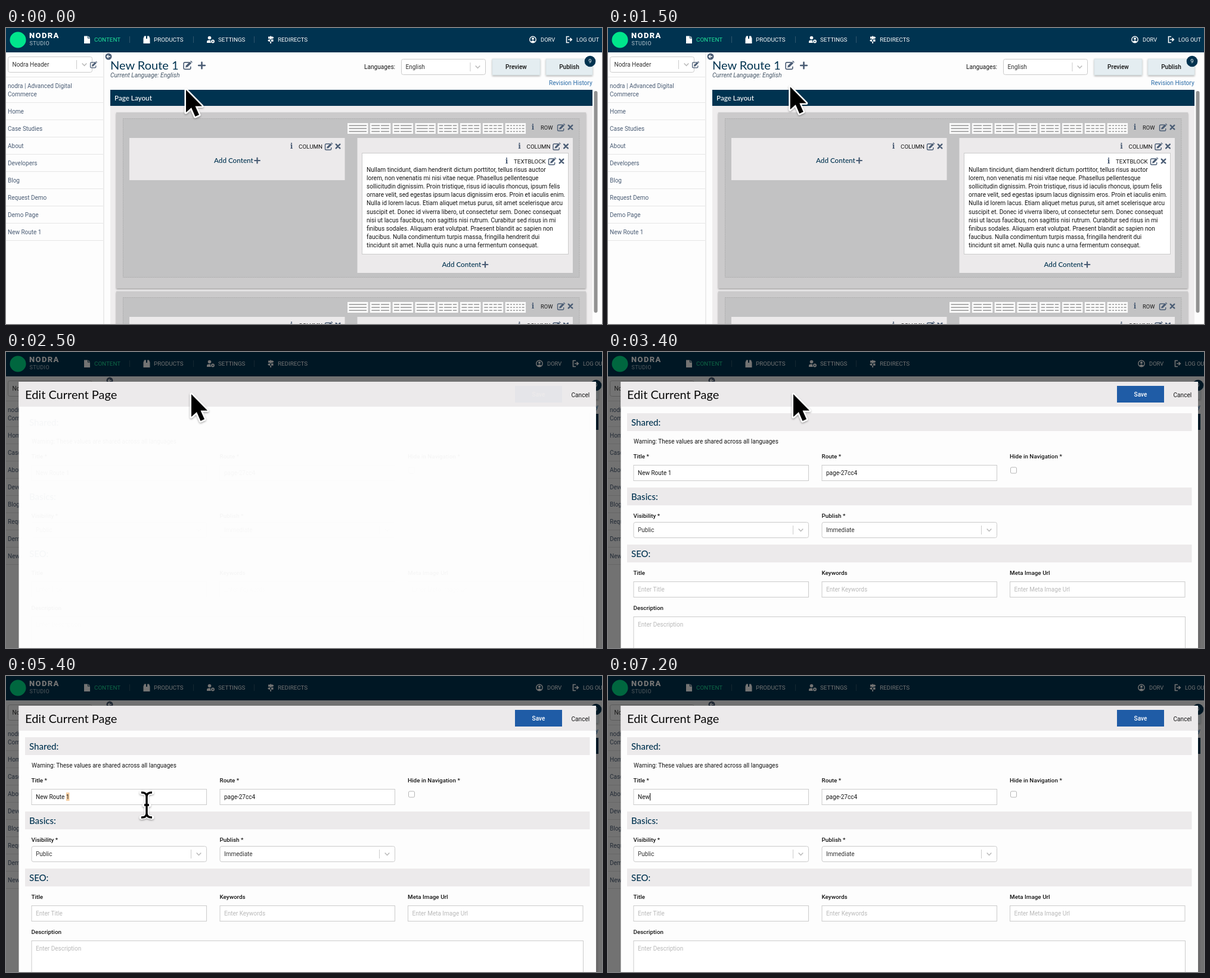
Animation, 1000 px wide and 498 px high, one loop 7300 ms. Source, as an HTML page:

```html
<!DOCTYPE html>
<html lang="en">
<head>
<meta charset="utf-8">
<title>Page editor</title>
<style>
  html, body { margin: 0; width: 100%; height: 100%; overflow: hidden; background: #fdfdfd; }
  svg { display: block; width: 100%; height: 100%; }
  text { font: 10px Roboto, sans-serif; white-space: pre; }
  .caps { font-size: 9.8px; }
  .small { font-size: 9.4px; }
  .body { font-size: 10.15px; }
  .label { font-weight: 500; font-size: 9.9px; }
  .button { font-weight: 500; font-size: 10.1px; }
  .italic { font-style: italic; font-size: 10.3px; }
  .head { font: 20px Lato, sans-serif; }
  .section { font: 500 15px Lato, sans-serif; }
  .bar { font: 500 11.7px Lato, sans-serif; }
  .info { font: bold 12px "DejaVu Serif", serif; }
  .brand { font-weight: 900; font-size: 13px; letter-spacing: 1.4px; }
  .sub { font-size: 9px; letter-spacing: .4px; }
</style>
</head>
<body>
<svg viewBox="0 0 1000 498" preserveAspectRatio="none">
  <defs>
    <filter id="shadow" x="-20%" y="-20%" width="140%" height="150%">
      <feDropShadow dx="0" dy="1.5" stdDeviation="1.5" flood-opacity=".35"/>
    </filter>
    <g id="edit" fill="none" stroke="#4b5d75">
      <path d="M2 -4.5H-4Q-6 -4.5 -6 -2.5V4Q-6 5.5 -4 5.5H2.5Q4.2 5.5 4.2 4V1.5" stroke-width="1.4"/>
      <path d="M-2 1.8L4.2 -4.4" stroke-width="3.2"/>
      <path d="M-3.6 3.2L-2.6 .6L-1 2.2Z" fill="#4b5d75" stroke="none"/>
      <path d="M4.8 -5L5.7 -5.9" stroke-width="3.2"/>
    </g>
    <path id="cross" d="M-3.3 -3.3L3.3 3.3M3.3 -3.3L-3.3 3.3" stroke="#4b5d75" stroke-width="2.4" stroke-linecap="round"/>
    <path id="plus" d="M-4.4 0H4.4M0 -4.4V4.4" stroke="#4b5d75" stroke-width="2.2" stroke-linecap="round"/>
    <path id="chevron" d="M-3.8 -2L0 2L3.8 -2" fill="none" stroke="#b8b8b8" stroke-width="1.5"/>
  </defs>
  <g id="page"></g>
  <g id="modal"></g>
  <g id="pointer"></g>
</svg>
<script>
const NAVY = '#003350', SLATE = '#4b5d75', PALE = '#eceaeb', INK = '#151515', LINE = '#cbcbcb';
const find = id => document.getElementById(id);

// Markup helpers; text is placed by the middle of its line.
const text = (x, y, str, cls = '', fill = INK, more = '') =>
  `<text x="${x}" y="${y + 3.5}" class="${cls}" fill="${fill}" ${more}>${str}</text>`;
const centered = (x, y, str, cls, fill) => text(x, y, str, cls, fill, 'text-anchor="middle"');
const rect = (x, y, w, h, fill, more = '') =>
  `<rect x="${x}" y="${y}" width="${w}" height="${h}" fill="${fill}" ${more}/>`;
const path = (d, fill, more = '') => `<path d="${d}" fill="${fill}" ${more}/>`;
const icon = (id, x, y, scale = 1) =>
  `<use href="#${id}" transform="translate(${x} ${y}) scale(${scale})"/>`;
const outlined = (x, y, w, h, radius = 0) =>
  rect(x + .5, y + .5, w - 1, h - 1, '#fff', `stroke="${LINE}" rx="${radius}"`);
const select = (x, y, w, value, gap) =>
  outlined(x, y, w, 27, 3) + text(x + 7.5, y + 13, value, '', '#333') +
  rect(x + w - gap, y + 6, 1, 15, LINE) + icon('chevron', x + w - 13.5, y + 13.5);

function header() {
  const separators = [207, 314, 416].map(x => rect(x, 14, 1, 11, '#2f566d')).join('');
  return rect(0, 0, 1000, 41, NAVY) +
    '<circle cx="20" cy="20" r="13.5" fill="#00e58c"/>' +
    text(39, 13.5, 'NODRA', 'brand', '#fff') + text(39.5, 25.5, 'STUDIO', 'sub', '#b9c8d1') +
    separators +
    path('M131 13.5H137V17.5H141V26H131Z M138 13.5L141 16.5H138Z', '#fff') +
    text(148, 19.5, 'CONTENT', 'caps', '#1fe39a') +
    path('M232 13.5H235V18H237V13.5H240L241.5 17.5V26H230.5V17.5Z', '#fff') +
    text(248, 19.5, 'PRODUCTS', 'caps', '#fff') +
    '<circle cx="341.5" cy="16.5" r="2.8" fill="#fff"/><circle cx="347" cy="22.5" r="2" fill="none" stroke="#fff" stroke-width="1.8"/>' +
    path('M337 25V23Q337 20.5 340 20.5H343Q343 24 344 25Z', '#fff') +
    text(356, 19.5, 'SETTINGS', 'caps', '#fff') +
    path('M440 14.5H447.5L449.5 16.3L447.5 18H440Z M448.5 19.3H441L439 21L441 22.8H448.5Z M443.3 13.5H445V26H443.3Z', '#fff') +
    text(456, 19.5, 'REDIRECTS', 'caps', '#fff') +
    '<g id="account">' +
    '<circle cx="884" cy="19.5" r="5.2" fill="none" stroke="#fff" stroke-width="1.4"/><circle cx="884" cy="18" r="2" fill="#fff"/>' +
    path('M880.5 23Q884 19 887.5 23Q884 26 880.5 23Z', '#fff') +
    text(897, 19.5, 'DORV', 'small', '#fff') +
    path('M945 14.5H940.5V24.5H945M943 19.5H949M946.5 16.8L949.3 19.5L946.5 22.2', 'none', 'stroke="#fff" stroke-width="1.6"') +
    text(957, 19.5, 'LOG OUT', 'small', '#fff') + '</g>';
}

function sidebar() {
  const links = ['Home', 'Case Studies', 'About', 'Developers', 'Blog', 'Request Demo', 'Demo Page', 'New Route 1'];
  return select(3, 48, 142, 'Nodra Header', 27) + icon('edit', 147, 62, .9) +
    rect(0, 82, 163, 1, '#e6e6e6') +
    text(3, 97, 'nodra | Advanced Digital', '', SLATE) + text(3, 111, 'Commerce', '', SLATE) +
    rect(0, 125, 163, 1, '#e6e6e6') +
    links.map((label, i) => text(3, 140 + 29 * i, label, '', SLATE) +
      rect(0, 154 + 29 * i, 163, 1, '#e6e6e6')).join('');
}

const tools = (right, y, label, cls, labelX, infoX) =>
  centered(infoX, y + .5, 'i', 'info', SLATE) + text(labelX, y, label, cls) +
  icon('edit', right - 15.5, y + .5) + icon('cross', right, y);

// Small pictures of the row layouts; each list holds the column breaks.
const layouts = [[], [1/2], [1/3], [2/3], [1/4, 3/4], [1/3, 2/3], [1/4, 1/2, 3/4], [1/6, 1/3, 1/2, 2/3, 5/6]];
const layoutIcon = (breaks, x, y) => rect(x, y, 34.5, 18, '#fafafa') +
  [4, 9, 14].map(dy => rect(x + 2.5, y + dy - .6, 29.5, 1.4, '#8d8d8d')).join('') +
  breaks.map(b => rect(x + 16.3 + (b - .5) * 29.5, y + 1, 2, 16, '#fafafa')).join('');

const addContent = (x, y) => text(x, y + .6, 'Add Content', 'bar', NAVY) + icon('plus', x + 72.5, y);

function row(y) {
  const column = (x, h) => rect(x, y + 43, 361.5, h, PALE) +
    tools(x + 350, y + 57, 'COLUMN', 'caps', x + 284, x + 272);
  return rect(185, y, 788, 296, '#cbcacb', 'filter="url(#shadow)"') +
    rect(196.5, y + 10.5, 765.5, 267, '#c2c2c3', 'stroke="#adadad" stroke-dasharray="2 1"') +
    layouts.map((breaks, i) => layoutIcon(breaks, 573 + 37.8 * i, y + 18)).join('') +
    tools(947, y + 25, 'ROW', 'small', 897, 884) +
    column(207, 71) + column(589.5, 227);
}

function content() {
  const lorem = [
    'Nullam tincidunt, diam hendrerit dictum porttitor, tellus risus auctor',
    'lorem, non venenatis mi nisi vitae neque. Phasellus pellentesque',
    'sollicitudin dignissim. Proin tristique, risus id iaculis rhoncus, ipsum felis',
    'ornare velit, sed egestas ipsum lacus dignissim eros. Proin et iaculis enim.',
    'Nulla id lorem lacus. Etiam aliquet metus purus, sit amet scelerisque arcu',
    'suscipit et. Donec id viverra libero, ut consectetur sem. Donec consequat',
    'nisi ut lacus faucibus, non sagittis nisi rutrum. Curabitur sed risus in mi',
    'finibus sodales. Aliquam erat volutpat. Praesent blandit ac sapien non',
    'faucibus. Nulla condimentum turpis massa, fringilla hendrerit dui',
    'tincidunt sit amet. Nulla quis nunc a urna fermentum consequat.'];
  const button = (x, w, label) =>
    rect(x, 52, w, 27, '#e4edf1', 'filter="url(#shadow)" stroke="#cdd9de" stroke-width=".6"') +
    centered(x + w / 2, 65, label, 'button', INK);
  return rect(163.5, 41, 1, 457, '#dcdcdc') +
    text(175, 66.5, 'New Route 1', 'head', NAVY) +
    icon('edit', 305, 63, 1.15) + icon('plus', 328.5, 63, 1.2) +
    text(175, 79.5, 'Current Language: English', 'italic', '#445566') +
    text(601, 65, 'Languages:', 'body') + select(663, 52, 142, 'English', 26.5) +
    button(816, 80, 'Preview') + button(906, 78, 'Publish') +
    `<circle cx="980" cy="56" r="9.3" fill="${NAVY}"/>` + centered(980, 55.5, '9', 'small', '#fff') +
    text(911, 92.5, 'Revision History', 'body', '#2a6ca8') +
    rect(175, 104, 809, 394, '#efedee') + rect(175, 104, 809, 27, NAVY) +
    text(182, 118.5, 'Page Layout', 'bar', '#fff') +
    row(142) + row(443) +
    addContent(349, 223) + addContent(731.5, 398) +
    outlined(597, 210, 347, 171) + tools(932, 224, 'TEXTBLOCK', 'caps', 852, 840) +
    lorem.map((line, i) => text(605, 238.3 + 14.17 * i, line, 'body')).join('') +
    rect(986.5, 106, 6, 373, '#929292', 'rx="3" id="scrollbar"');
}

find('page').innerHTML = rect(0, 0, 1000, 498, '#fdfdfd') + sidebar() +
  `<g id="content">${content()}</g>` + header() +
  `<g id="collapse"><circle cx="172" cy="48" r="5.5" fill="${SLATE}"/>` +
  path('M175 48H169.5M171.8 45.5L169.3 48L171.8 50.5', 'none', 'stroke="#fff" stroke-width="1.3"') + '</g>';

const section = (y, label) => rect(32, y, 947.5, 30, PALE) + text(39, y + 17.3, label, 'section', NAVY);
const field = (x, y, label, value, fill) =>
  text(x, y - 15, label, 'label') + outlined(x, y, 294.5, 27) + text(x + 7.5, y + 13, value, '', fill);
const picker = (x, label, value) => text(x, 275, label, 'label') + select(x, 286, 294.5, value, 27);

find('modal').innerHTML = rect(0, 0, 1000, 498, 'rgba(0,0,0,.55)') +
  rect(21.5, 50, 968.5, 448, '#fdfdfd') + rect(21.5, 50, 968.5, 42, PALE) +
  text(32, 75.3, 'Edit Current Page', 'head', '#080808') + text(948.5, 72, 'Cancel', 'body') +
  '<g id="form">' +
  rect(854, 57, 79, 28, '#1f5ca6') + centered(893.5, 71, 'Save', 'button', '#fff') +
  section(103, 'Shared:') + section(228, 'Basics:') + section(324, 'SEO:') +
  text(43, 150.5, 'Warning: These values are shared across all languages') +
  field(42.5, 190, 'Title *', '') + field(358.5, 190, 'Route *', 'page-27cc4') +
  rect(0, 196, 0, 14, '#f6cfa4', 'id="selection"') +
  text(50, 203, 'New Route 1', '', INK, 'id="title"') +
  rect(0, 197, 1, 12.5, '#000', 'id="caret"') +
  text(674, 175, 'Hide in Navigation *', 'label') +
  rect(675.5, 194, 10, 10, '#fff', 'rx="2" stroke="#b5b5b5"') +
  picker(42.5, 'Visibility *', 'Public') + picker(358.5, 'Publish *', 'Immediate') +
  field(42.5, 386, 'Title', 'Enter Title', '#b9b9b9') +
  field(358.5, 386, 'Keywords', 'Enter Keywords', '#b9b9b9') +
  field(674, 386, 'Meta Image Url', 'Enter Meta Image Url', '#b9b9b9') +
  text(42.5, 430.5, 'Description', 'label') + outlined(42.5, 445, 926.5, 70) +
  text(50, 458, 'Enter Description', '', '#b9b9b9') + '</g>';

const beam = 'M-9 -21Q0 -21 0 -14Q0 -21 9 -21M0 -14V14M-9 21Q0 21 0 14Q0 21 9 21M-4 0H4';
find('pointer').innerHTML = '<g filter="url(#shadow)">' +
  path('M0 0V38L9 30L15.5 45L22 42L15.5 27.5H27Z', '#000', 'id="arrow" stroke="#fff" stroke-width="5" paint-order="stroke" stroke-linejoin="round"') +
  '<g id="beam">' + path(beam, 'none', 'stroke="#fff" stroke-width="6.5" stroke-linecap="round"') +
  path(beam, 'none', 'stroke="#000" stroke-width="3.4"') + '</g></g>';

const LOOP = 7300, OPEN = 2500, CLICK = 4900, SELECT = 5400, TYPE = 6700;
const OLD_TITLE = 'New Route 1', NEW_TITLE = 'New';
const stops = [[0, 302, 104], [900, 305, 103], [1300, 305, 103], [2200, 311, 71], [3700, 311, 71], [4700, 236, 217]];

function pointerAt(t) {
  const next = stops.findIndex(stop => stop[0] > t);
  if (next < 0) return stops.at(-1).slice(1);
  const [t0, x0, y0] = stops[next - 1], [t1, x1, y1] = stops[next];
  const p = (t - t0) / (t1 - t0), ease = p * p * (3 - 2 * p);
  return [x0 + (x1 - x0) * ease, y0 + (y1 - y0) * ease];
}

const show = (id, on) => find(id).setAttribute('visibility', on ? 'inherit' : 'hidden');
const shift = (id, dx) => find(id).setAttribute('transform', `translate(${dx} 0)`);

function drawTitle(t) {
  const title = find('title'), selection = find('selection'), caret = find('caret');
  const typed = t >= TYPE ? Math.min(NEW_TITLE.length, 1 + Math.floor((t - TYPE) / 200)) : 0;
  const value = typed ? NEW_TITLE.slice(0, typed) : OLD_TITLE;
  if (title.textContent !== value) title.textContent = value;
  const selecting = t >= SELECT && t < TYPE;
  const picked = selecting ? Math.min(value.length, 1 + Math.max(0, Math.floor((t - SELECT - 200) / 80))) : 0;
  const edge = n => 50 + (n ? title.getSubStringLength(0, n) : 0);
  const start = edge(value.length - picked), end = edge(value.length);
  selection.setAttribute('x', start);
  selection.setAttribute('width', end - start);
  caret.setAttribute('x', end + .3);
  show('caret', t >= CLICK && !selecting);
}

function draw(t) {
  const open = t >= OPEN;
  find('modal').style.display = open ? '' : 'none';
  shift('account', open ? 11 : 0);
  shift('content', open ? 10 : 0);
  shift('collapse', open ? 2 : 0);
  show('scrollbar', !open);
  if (open) {
    find('form').setAttribute('opacity', Math.min(1, .03 + (t - OPEN) / 350));
    drawTitle(t);
  }
  const [x, y] = pointerAt(t), overField = open && y > 190;
  find('pointer').setAttribute('transform', `translate(${x} ${y})`);
  show('pointer', t < TYPE);
  show('arrow', !overField);
  show('beam', overField);
}

function tick() {
  draw(Math.floor(performance.now() % LOOP / 100) * 100);
  requestAnimationFrame(tick);
}
tick();
</script>
</body>
</html>
```
